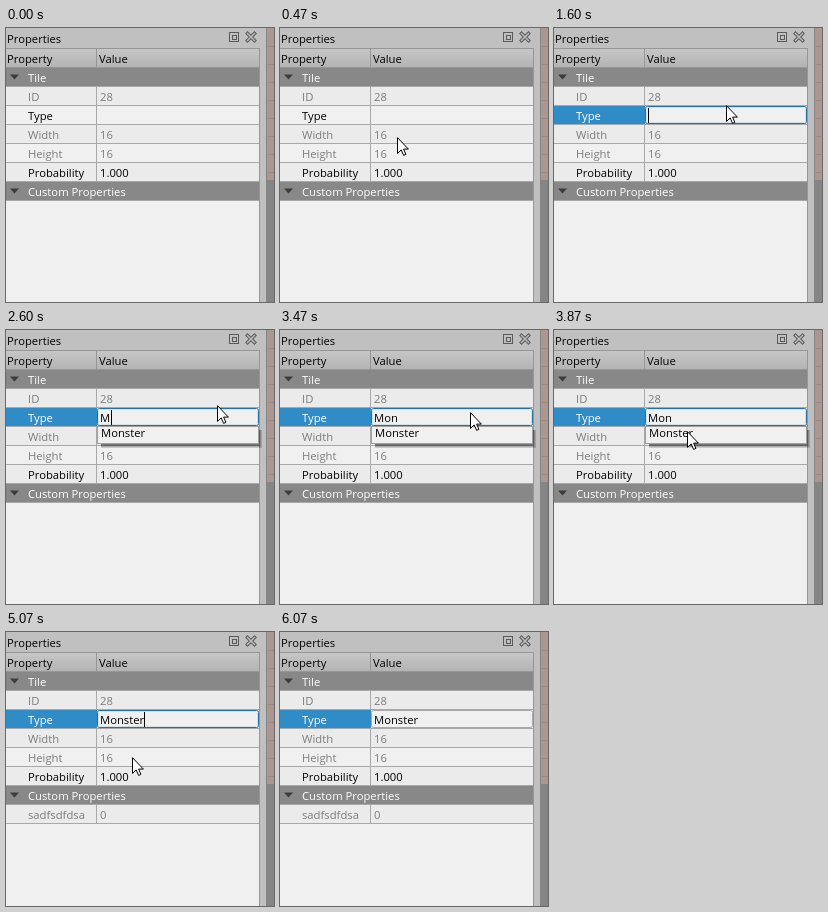
Recreate the animation shown at these times as an HTML page. Size 268 px wide and 274 px high, loop 6.34 s.

```html
<!DOCTYPE html>
<html lang="en">
<head>
<meta charset="utf-8">
<title>Properties panel</title>
<style>
html, body { margin: 0; width: 100%; height: 100%; overflow: hidden; background: #f0f0f0; }
svg { display: block; width: 268px; height: 274px; }
text { font: 11.25px "Open Sans", "Noto Sans", sans-serif; white-space: pre; }
</style>
</head>
<body>
<svg id="stage" viewBox="0 0 268 274">
  <linearGradient id="head" x2="0" y2="1">
    <stop stop-color="#c6c6c6"/><stop offset="1" stop-color="#b4b4b4"/>
  </linearGradient>
</svg>
<script>
const NS = "http://www.w3.org/2000/svg";
const stage = document.getElementById("stage");
const LOOP = 6340, FPS = 15;
const RIGHT = 253, SPLIT = 90, ROW = 19;
const DOCK = "#c0c0c0", PAPER = "#f0f0f0", GRID = "#a8a8a8", EDGE = "#969696";
const DIM = "#7c7c7c", INK = "#000000", BLUE = "#308cc6", FOCUS = "#2671a0";

function add(tag, attrs, parent = stage) {
  const el = document.createElementNS(NS, tag);
  for (const key in attrs) el.setAttribute(key, attrs[key]);
  parent.appendChild(el);
  return el;
}
const group = () => add("g", {});
const rect = (x, y, width, height, fill, parent) =>
  add("rect", { x, y, width, height, fill }, parent);
const frame = (x, y, w, h, fill, stroke, parent, rx = 0) =>
  add("rect", { x: x + .5, y: y + .5, width: w - 1, height: h - 1, rx, fill, stroke }, parent);
function label(x, y, str, fill, parent) {
  const el = add("text", { x, y, fill }, parent);
  el.textContent = str;
  return el;
}
const show = (el, on) => el.setAttribute("visibility", on ? "visible" : "hidden");

function heading(y, title) {
  rect(0, y, RIGHT, ROW - 1, "#888888");
  rect(0, y + ROW - 1, RIGHT, 1, GRID);
  add("path", { d: `M4 ${y + 6.5}h9l-4.5 5z`, fill: "#3c3c3c" });
  label(22, y + 14, title, "#ffffff");
}
function row(y, name, value, nameFill, valueFill, parent) {
  const fill = (y - 40) / ROW % 2 ? "#ebebeb" : PAPER;
  rect(0, y, RIGHT, ROW - 1, fill, parent);
  rect(0, y + ROW - 1, RIGHT, 1, GRID, parent);
  rect(SPLIT, y, 1, ROW, GRID, parent);
  label(22, y + 14, name, nameFill, parent);
  label(94, y + 14, value, valueFill, parent);
}

// Dock title, buttons and column header
rect(0, 0, 268, 274, DOCK);
rect(0, 40, RIGHT, 234, PAPER);
label(1, 15, "Properties", INK);
frame(223, 4, 10, 10, "none", "#5a5a5a");
frame(226, 7, 5, 5, "none", "#5a5a5a");
const cross = "M241.5 5.5l7 7m0-7l-7 7";
add("path", { d: cross, stroke: "#5a5a5a", "stroke-width": 3.4, "stroke-linecap": "square" });
add("path", { d: cross, stroke: DOCK, "stroke-width": 1.4, "stroke-linecap": "square" });
rect(0, 20, RIGHT, 1, EDGE);
rect(0, 21, RIGHT, 18, "url(#head)");
rect(0, 39, RIGHT, 1, EDGE);
rect(SPLIT, 21, 1, 18, EDGE);
label(1, 35, "Property", INK);
label(93, 35, "Value", INK);

// Property rows
heading(40, "Tile");
row(59, "ID", "28", DIM, DIM);
row(78, "Type", "", INK, INK);
row(97, "Width", "16", DIM, DIM);
row(116, "Height", "16", DIM, DIM);
row(135, "Probability", "1.000", INK, INK);
heading(154, "Custom Properties");
const extra = group();
row(173, "sadfsdfdsa", "0", DIM, DIM, extra);
rect(RIGHT, 20, 1, 254, EDGE);

// Strip of the map view
rect(260, 0, 8, 274, "#858585");
rect(261, 0, 7, 152, "#ab978f");
for (let y = 18; y < 152; y += 18) rect(262, y, 6, 1, "#9c8880");

// Value editor
const editor = group();
rect(0, 78, SPLIT + 1, 18, BLUE, editor);
label(22, 92, "Type", "#ffffff", editor);
const field = frame(91, 78, 162, 18, PAPER, FOCUS, editor, 2);
const glow = frame(92, 79, 160, 16, "none", "#d2e0e9", editor, 1);
const typed = label(94, 92, "", INK, editor);
const caret = rect(94, 80, 1, 15, "#000000", editor);

// Completion list
const popup = group();
for (let i = 4; i > 0; i--) rect(95, 100, 157 + i, 14 + i, "rgba(0,0,0,.16)", popup);
frame(91, 96, 162, 18, PAPER, "#a0a0a0", popup);
label(95, 107, "Monster", INK, popup);

// Pointers
const arrow = add("path", {
  d: "M.5 .7V16.4L4.2 12.9L6.6 18.4L8.9 17.4L6.6 12.1H11.4Z",
  fill: "#ffffff", stroke: "#000000", "stroke-linejoin": "round"
});
const beam = add("path", {
  d: "M95 78.5h3m1 0h3M98.5 79v14M95 93.5h3m1 0h3", fill: "none", stroke: "#000000"
});

// Pointer moves: [first step, last step, from, to, easing]
const out = u => 1 - (1 - u) ** 2;
const easeIn = u => u ** 1.3;
const moves = [
  [1, 10, [258, 258], [99, 90], out],
  [10, 13, [99, 90], [96, 85], out],
  [24, 25, [172, 77], [199, 71], out],
  [25, 26, [199, 71], [211, 75], out],
  [51, 58, [211, 75], [133, 101], out],
  [58, 61, [133, 101], [122, 100], out],
  [61, 62, [122, 100], [121, 100], out],
  [76, 83, [126, 125], [187, 264], easeIn]
];
function pointer(k) {
  const [a, b, from, to, ease] = moves.filter(m => m[0] <= k).pop() || moves[0];
  const p = ease(Math.min(1, Math.max(0, (k - a) / (b - a))));
  return from.map((v, i) => Math.round(v + (to[i] - v) * p));
}

// Typed text: [step, text, caret x]
const typing = [[0, "", 94], [39, "M", 105], [43, "Mo", 112], [44, "Mon", 119], [65, "Monster", 138]];
function caretOn(k) {
  const start = k < 39 ? 17 : k < 44 ? k : 44;
  return k < 84 && Math.floor((k - start) / 8) % 2 === 0;
}

function draw(t) {
  const k = Math.floor((t + 4) * FPS / 1000);
  const [x, y] = pointer(k);
  const isBeam = k >= 20 && k < 24;
  arrow.setAttribute("transform", `translate(${x} ${y})`);
  show(arrow, k >= 1 && k < 84 && !isBeam);
  show(beam, isBeam);

  const [, str, caretX] = typing.filter(s => s[0] <= k).pop();
  typed.textContent = str;
  caret.setAttribute("x", caretX);
  editor.style.display = k >= 17 ? "" : "none";
  field.setAttribute("stroke", k < 91 ? FOCUS : GRID);
  show(glow, k < 91);
  show(caret, caretOn(k));
  show(popup, k >= 39 && k < 68);
  show(extra, k >= 65);
}

const begin = performance.now();
function tick() {
  draw((performance.now() - begin) % LOOP);
  requestAnimationFrame(tick);
}
draw(0);
requestAnimationFrame(tick);
</script>
</body>
</html>
```
